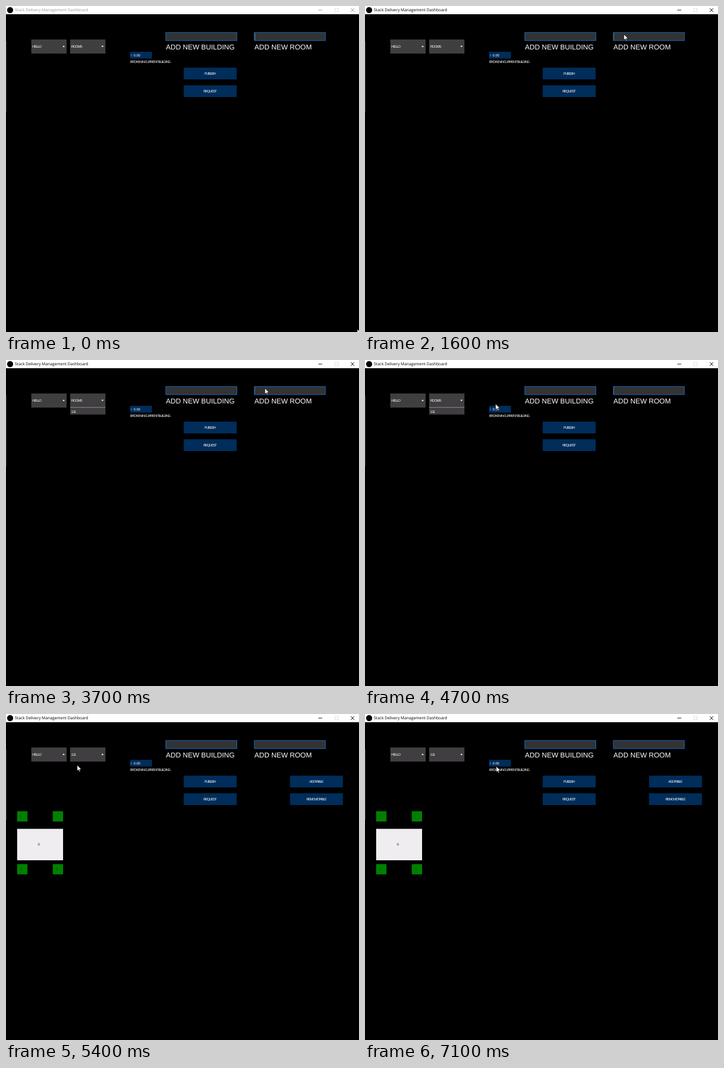
Animation of 600x555 px, one loop 7.2 s. Source, as an HTML page with a canvas:

```html
<!DOCTYPE html>
<html lang="en">
<head>
<meta charset="utf-8">
<title>Dashboard</title>
<style>
  html, body { margin: 0; width: 100%; height: 100%; overflow: hidden; background: #000; }
  canvas { display: block; }
</style>
</head>
<body>
<canvas id="stage" width="600" height="555"></canvas>
<script>
const ctx = document.getElementById('stage').getContext('2d');
const LOOP = 7200, STEP = 100;
const FOCUS = 1200, ENTER = 3400, SELECT = 5400;
const NAVY = '#002d5a', GREY = '#403e40';
const ARIAL = '"Liberation Sans", Arial, sans-serif';

// Pointer stops: time, x, y
const POINTER = [
  [0, 597, 550], [100, 597, 550], [800, 440, 48], [4200, 440, 48],
  [5000, 121, 87], [5800, 121, 87], [6400, 223, 89], [LOOP, 223, 89]
];
// Room name typing: time at which each character appears
const ROOM = '1.11', KEYS = [1800, 2000, 2200, 2400];

function rect(x, y, w, h, color) {
  ctx.fillStyle = color;
  ctx.fillRect(x, y, w, h);
}

function text(str, x, y, size, color = '#fff', { family = ARIAL, spacing = 0, align = 'left' } = {}) {
  ctx.font = `${size}px ${family}`;
  ctx.letterSpacing = spacing + 'px';
  ctx.textAlign = align;
  ctx.textRendering = 'geometricPrecision';
  ctx.fillStyle = color;
  ctx.fillText(str, x, y);
}

const tiny = (str, x, y, color = '#fff', align = 'left', spacing = -1) =>
  text(str, x, y + 2.2, 6, color, { spacing, align });

function polygon(points, fill, stroke) {
  ctx.beginPath();
  points.forEach(([x, y]) => ctx.lineTo(x, y));
  ctx.closePath();
  ctx.fillStyle = fill;
  ctx.fill();
  if (stroke) {
    ctx.strokeStyle = stroke;
    ctx.lineWidth = 0.7;
    ctx.stroke();
  }
}

function line(x1, y1, x2, y2, color) {
  ctx.strokeStyle = color;
  ctx.lineWidth = 0.9;
  ctx.beginPath();
  ctx.moveTo(x1, y1);
  ctx.lineTo(x2, y2);
  ctx.stroke();
}

function titleBar(focused) {
  const ink = focused ? '#000' : '#999';
  rect(0, 0, 600, 14, '#fff');
  ctx.fillStyle = '#000';
  ctx.beginPath();
  ctx.arc(7, 7, 5.2, 0, 7);
  ctx.fill();
  text('Stack Delivery Management Dashboard', 15, 9.3, 6.8, ink, { family: '"Open Sans", sans-serif' });
  line(531, 7, 537.5, 7, ink);
  ctx.strokeStyle = '#ddd';
  ctx.strokeRect(559, 4, 5.5, 5.5);
  line(586, 4, 592, 10, ink);
  line(592, 4, 586, 10, ink);
  rect(0, 60, 1, 121, '#333');
}

function dropdown(label, x, open) {
  rect(x, 57, 60, 24, GREY);
  tiny(label, x + 2, 69);
  const tip = open ? 70.3 : 67.3, base = open ? 67.8 : 69.8;
  polygon([[x + 53, base], [x + 57, base], [x + 55, tip]], '#fff');
}

function field(label, x, width) {
  rect(x, 44.5, width, 15, '#16599a');
  rect(x + 1.3, 45.8, width - 2.6, 12.4, '#333');
  text(label, x + 0.8, 74, 12);
}

function button(label, x, y) {
  rect(x, y, 90, 20, NAVY);
  tiny(label, x + 44.5, y + 10, '#fff', 'center');
}

function chair(label, x, y) {
  rect(x, y, 17.5, 17.5, '#008000');
  tiny(label, x + 5, y + 8.5, '#003f00');
}

function table() {
  chair('0', 19, 165.5);
  chair('2', 79.5, 165.5);
  chair('1', 19, 255.5);
  chair('3', 79.5, 255.5);
  rect(19, 195.5, 78, 53.5, '#efedf0');
  tiny('0', 54.3, 221.5, '#222');
}

function pointerAt(t) {
  const i = POINTER.findIndex(p => p[0] > t);
  const [t0, x0, y0] = POINTER[i - 1], [t1, x1, y1] = POINTER[i];
  const k = (t - t0) / (t1 - t0), e = k * k * (3 - 2 * k);
  return [x0 + (x1 - x0) * e, y0 + (y1 - y0) * e];
}

function pointer(x, y) {
  const outline = [[0, 0], [0, 10], [2.3, 8], [3.8, 11.4], [5.3, 10.7], [3.8, 7.4], [7, 7.2]];
  polygon(outline.map(([dx, dy]) => [x + dx, y + dy]), '#fff', '#000');
}

function draw(t) {
  const selected = t >= SELECT;
  const [px, py] = pointerAt(t);
  rect(0, 0, 600, 555, '#000');
  titleBar(t >= FOCUS);

  dropdown('HELLO', 43, false);
  dropdown(selected ? ROOM : 'ROOMS', 109, !selected);
  if (t >= ENTER && !selected) {
    const hover = px >= 109 && px < 169 && py >= 81 && py < 93;
    rect(109, 80.5, 60, 1, hover ? '#777' : '#bbb');
    rect(109, 81.5, 60, 11.3, hover ? '#e1e0e2' : GREY);
    tiny(ROOM, 111, 87.3);
  }

  rect(211, 78, 37, 11.5, NAVY);
  polygon([[212, 81], [212, 87], [215, 84]], '#0869b8');
  tiny('0.00', 217, 84, '#fff', 'left', -0.1);
  tiny('BROKEN IN CURRENT BUILDING', 211, 95);

  field('ADD NEW BUILDING', 271, 122);
  field('ADD NEW ROOM', 421.5, 122);
  const typed = t < ENTER ? ROOM.slice(0, KEYS.filter(k => t >= k).length) : '';
  text(typed, 422.5, 56.8, 12);
  if (!selected) {
    const caretX = 422.5 + (typed ? ctx.measureText(typed).width - 0.8 : 0);
    ctx.globalAlpha = 0.6 + 0.3 * Math.sin(t / 160);
    rect(caretX, 45.5, 1, 12.5, '#79b4c8');
    ctx.globalAlpha = 1;
  }

  button('PUBLISH', 302, 105);
  button('REQUEST', 302, 135);
  if (selected) {
    button('ADDTABLE', 482.7, 105);
    button('REMOVETABLE', 482.7, 135);
    table();
  }
  pointer(px, py);
}

function frame(now) {
  draw(Math.floor(now % LOOP / STEP) * STEP);
  requestAnimationFrame(frame);
}
requestAnimationFrame(frame);
</script>
</body>
</html>
```
